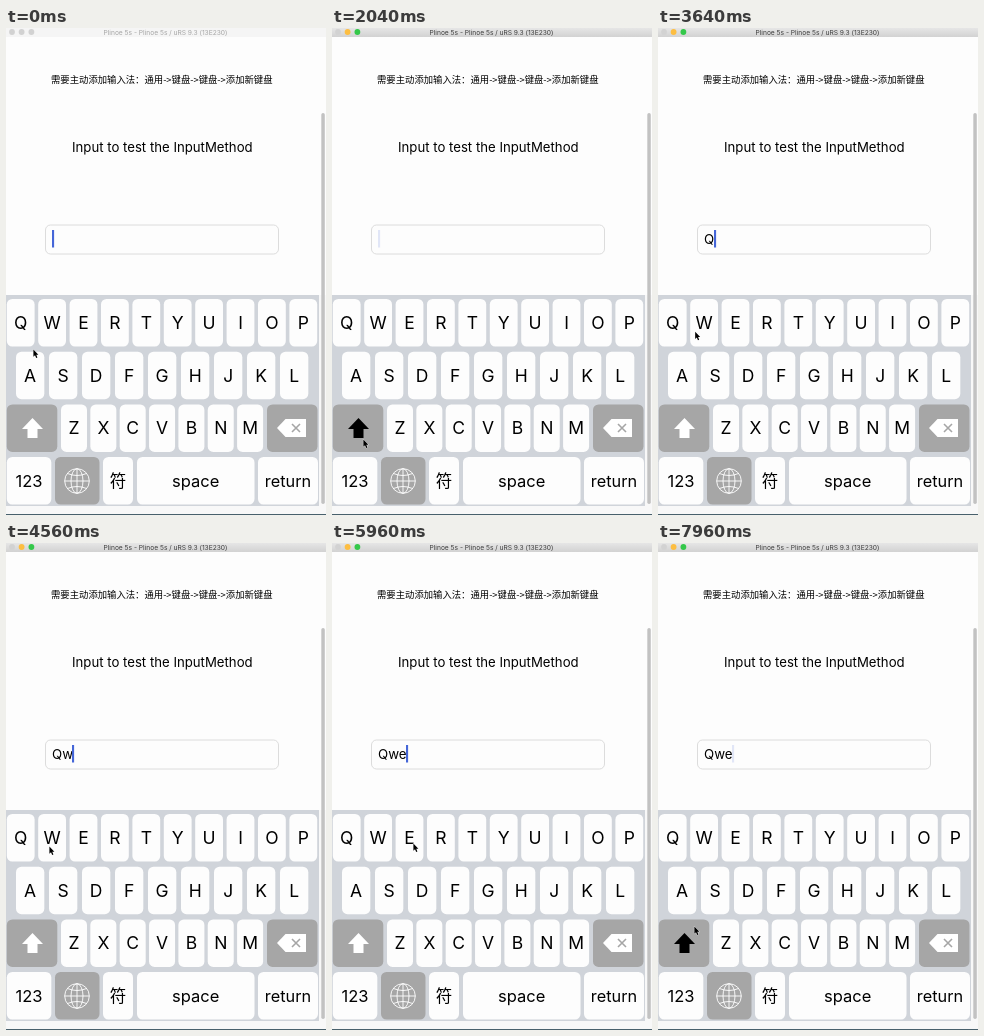
An HTML page that plays this animation: 320 px wide and 487 px high, repeating every 8 s.

```html
<!DOCTYPE html>
<html lang="en">
<head>
<meta charset="utf-8">
<title>Keyboard test</title>
<style>
  html, body { margin: 0; width: 100%; height: 100%; overflow: hidden; background: #fff; }
  svg { display: block; width: 100%; height: 100%; }
  text { font-family: Inter, Roboto, sans-serif; fill: #000; }
  .mid { text-anchor: middle; }
  .cjk { font-family: "Noto Sans CJK SC", "Noto Sans CJK", sans-serif; }
</style>
</head>
<body>
<svg viewBox="0 0 320 487">
  <defs>
    <linearGradient id="bar" x2="0" y2="1">
      <stop stop-color="#e6e6e6"/><stop offset="1" stop-color="#d2d2d2"/>
    </linearGradient>
  </defs>
  <rect width="320" height="487" fill="#fdfdfd"/>
  <rect id="titleBar" width="320" height="9"/>
  <g id="lights"><circle cx="6" cy="4" r="2.9"/><circle cx="15.6" cy="4" r="2.9"/><circle cx="25.4" cy="4" r="2.9"/></g>
  <text id="title" class="mid" x="159.5" y="6.6" font-size="6.65">Plinoe 5s - Plinoe 5s / uRS 9.3 (13E230)</text>

  <text class="cjk" x="45" y="54.6" font-size="9.35">需要主动添加输入法：通用-&gt;键盘-&gt;键盘-&gt;添加新键盘</text>
  <text x="66" y="123.6" font-size="13.2">Input to test the InputMethod</text>

  <rect x="39.5" y="197" width="233" height="29" rx="5" fill="#fdfdfd" stroke="#d8d8d8" stroke-width=".9"/>
  <text id="typed" x="46" y="216" font-size="13.3"></text>
  <rect id="caret" y="202" width="2.1" height="17.5" fill="#4566d8"/>

  <rect y="267" width="313" height="211" fill="#d0d4da"/>
  <g id="keys"></g>
  <path id="shift" d="M26.5 390 37 401H31.5V410H21.5V401H16Z"/>
  <path d="M271 400 279.5 391H300V409H279.5Z" fill="#fff"/>
  <path d="M286 396l8 8m0-8l-8 8" stroke="#a6a6a6" stroke-width="1.6"/>
  <g fill="none" stroke="#fff" stroke-width=".9">
    <circle cx="71" cy="453" r="12.3"/><ellipse cx="71" cy="453" rx="6" ry="12.3"/>
    <path d="M71 440.7v24.6M58.7 453h24.6M61.5 445.5q9.5 4 19 0M61.5 460.5q9.5-4 19 0"/>
  </g>

  <rect x="313" y="267" width="7" height="219" fill="#f8f8f8"/>
  <rect y="478" width="320" height="8" fill="#f8f8f8"/>
  <rect x="315.3" y="85" width="3.5" height="391" rx="1.75" fill="#c2c2c2"/>
  <rect y="486" width="320" height="1" fill="#48606c"/>
  <path id="pointer" d="M0 0V7.2L1.6 5.8 2.8 8.4 4 7.9 2.9 5.3H5Z" fill="#000" stroke="#fff" stroke-width=".7" paint-order="stroke"/>
</svg>
<script>
const $ = id => document.getElementById(id);
const LOOP = 8000, GRAY = "#a6a6a6", KEY = "#fdfdfd";
const keyRects = {};

function addKey(label, x, y, w, { fill = KEY, size = 17.5, cls = "" } = {}) {
  const group = document.createElementNS("http://www.w3.org/2000/svg", "g");
  group.innerHTML =
    `<rect x="${x}" y="${y}" width="${w}" height="47.5" rx="5.5" fill="${fill}"/>
     <text class="mid ${cls}" x="${x + w / 2}" y="${y + 30}" font-size="${size}">${label}</text>`;
  $("keys").append(group);
  keyRects[label] = group.firstElementChild;
}
function addRow(letters, x, y, pitch, w) {
  [...letters].forEach((letter, i) => addKey(letter, x + i * pitch, y, w));
}
addRow("QWERTYUIOP", 0.8, 271, 31.4, 27.8);
addRow("ASDFGHJKL", 10, 323.7, 33, 28.3);
addRow("ZXCVBNM", 55, 376.4, 29.35, 26);
addKey("", 0.8, 376.4, 50.5, { fill: GRAY });
addKey("", 261, 376.4, 50.5, { fill: GRAY });
addKey("123", 0.8, 429, 44.5, { size: 16.5 });
addKey("", 49, 429, 44.5, { fill: GRAY });
addKey("符", 97, 429, 30, { size: 16.5, cls: "cjk" });
addKey("space", 131, 429, 117.5, { size: 16.5 });
addKey("return", 252, 429, 60, { size: 16.3 });

// Pointer waypoints: time, x, y
const path = [
  [0, 27, 321], [500, 27, 321], [1320, 31, 411], [2040, 31, 411], [2500, 20, 340],
  [2800, 19, 305], [2880, 19, 304], [3320, 19, 304], [3800, 43, 303], [4560, 43, 303],
  [5120, 81, 300], [5960, 81, 300], [6480, 65, 331], [7000, 37, 396], [7200, 36, 396],
  [7810, 36, 396], [7960, 36, 383], [LOOP, 36, 383]
];
const presses = [["Q", 3120], ["W", 4360], ["E", 5480]];
const caretStops = [46, 56, 66, 74];
const blinks = [930, 2005, 6725, 7925];
const blinkShape = [[0, 1], [35, .15], [100, 0], [200, 0], [350, 1]];

function lerpKeys(keys, t, column, ease = u => u) {
  const i = keys.findIndex(key => key[0] > t);
  if (i < 0) return keys[keys.length - 1][column];
  if (i === 0) return keys[0][column];
  const a = keys[i - 1], b = keys[i];
  return a[column] + (b[column] - a[column]) * ease((t - a[0]) / (b[0] - a[0]));
}
const smooth = u => u * u * (3 - 2 * u);

function draw(t) {
  const active = t >= 1480;
  $("titleBar").setAttribute("fill", active ? "url(#bar)" : "#f5f5f5");
  $("title").style.fill = active ? "#3c3c3c" : "#a5a5a5";
  ["#d2d2d2", "#fdbe41", "#34c84a"].forEach((color, i) =>
    $("lights").children[i].setAttribute("fill", active ? color : "#d2d2d2"));

  const upper = (t >= 1520 && t < 3160) || t >= 7360;
  $("shift").setAttribute("fill", upper ? "#000" : "#fff");

  for (const [key, start] of presses)
    keyRects[key].setAttribute("fill", t >= start && t < start + 200 ? "#aaa" : KEY);

  const count = presses.filter(([, start]) => t >= start + 40).length;
  $("typed").textContent = "Qwe".slice(0, count);
  $("caret").setAttribute("x", caretStops[count]);
  $("caret").setAttribute("opacity", Math.min(...blinks.map(start => lerpKeys(blinkShape, t - start, 1))));

  const x = lerpKeys(path, t, 1, smooth) + 0.4, y = lerpKeys(path, t, 2, smooth) + 0.5;
  $("pointer").setAttribute("transform", `translate(${x} ${y})`);
}

const began = performance.now();
function tick() {
  const t = (performance.now() - began) % LOOP;
  draw(Math.floor(t / 40) * 40);
  requestAnimationFrame(tick);
}
tick();
</script>
</body>
</html>
```
